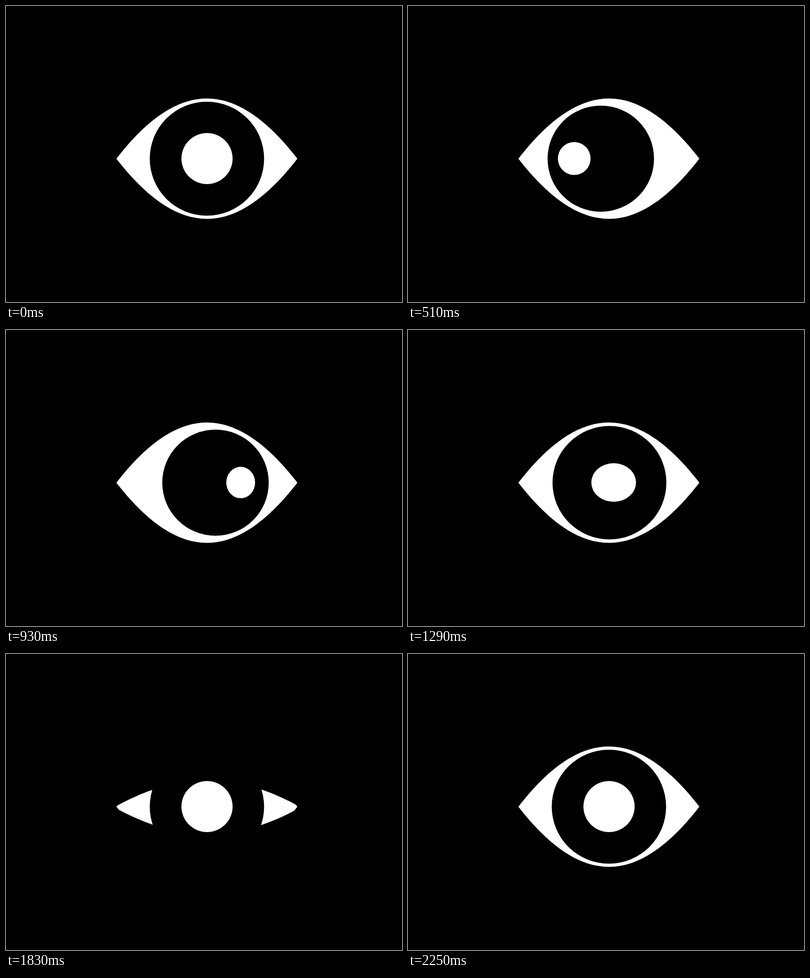
Recreate the animation shown at these times as an HTML page. Size 800x600 px, loop 2520 ms.

```html
<!DOCTYPE html>
<html lang="en">
<head>
<meta charset="utf-8">
<title>Eye</title>
<style>
  html, body { margin: 0; width: 100%; height: 100%; overflow: hidden; background: #000; }
  svg { display: block; width: 100vw; height: 100vh; }
</style>
</head>
<body>
<svg viewBox="0 0 800 600">
  <path id="eye" fill="#fff"/>
  <circle id="iris" cy="309.5"/>
  <ellipse id="pupil" cy="309.2" fill="#fff"/>
  <path id="lids" fill-rule="evenodd"/>
</svg>
<script>
const LOOP = 2520, STEP = 30;
const $ = id => document.getElementById(id);
const set = (el, attrs) => {
  for (const k in attrs) el.setAttribute(k, attrs[k]);
};
const span = (t, a, b) => Math.min(1, Math.max(0, (t - a) / (b - a)));
const inOut = (p, k) =>
  p < 0.5 ? 2 ** (k - 1) * p ** k : 1 - 2 ** (k - 1) * (1 - p) ** k;

// Look direction: 0 ahead, -1 left, 1 right; a higher power is snappier.
function gaze(t, power) {
  const leg = (a, b) => inOut(span(t, a, b), power);
  return 2 * leg(540, 1020) - leg(0, 540) - leg(1060, 1410);
}

// Almond outline; top and bottom are the heights at the middle.
function almond(cx, cy, half, top, bottom) {
  const at = (x, y) => `${cx + half * x} ${cy + y}`;
  const arch = (s, h) =>
    `C${at(s * 0.765, h * 0.455)} ${at(s * 0.415, h)} ${at(0, h)}` +
    `C${at(-s * 0.415, h)} ${at(-s * 0.765, h * 0.455)} ${at(-s, 0)}`;
  return `M${at(-1, 0)}${arch(-1, -top)}${arch(1, bottom)}Z`;
}

// Half the distance between the lids: a slow close, then a quick opening.
function lidGap(t) {
  const shut = inOut(span(t, 1610, 2070) ** 0.85, 2);
  return 129.5 * (1 - shut + inOut(span(t, 2070, 2250), 2.45));
}

function draw(t) {
  const u = gaze(t, 5.5);
  set($("iris"), { cx: 405.9 + u * (16.9 + 0.5 * u), r: 115.5 - 8 * Math.abs(u) });

  // The pupil shrinks to the sides and stretches along its way.
  const g = gaze(t, 3.5);
  const side = Math.abs(g) ** 0.37;
  const r = 51.7 - (20 + 1.5 * g) * side;
  const stretch = side * (14 * (1 - side) - 0.9 - 0.7 * g);
  set($("pupil"), { cx: 406.1 + 70.3 * g, rx: r + stretch, ry: r - stretch });

  const gap = lidGap(t);
  const hole = almond(407, 310.7, 188, gap - 1.3, gap * 0.95 + 1.3);
  const blinking = t > 1620 && t < 2250;
  set($("lids"), { d: blinking ? "M0 0H800V600H0Z" + hole : "" });
}

set($("eye"), { d: almond(405.8, 309.5, 182.8, 122, 122) });

const start = performance.now();
function tick() {
  const t = (performance.now() - start) % LOOP;
  draw(Math.floor(t / STEP) * STEP);
  requestAnimationFrame(tick);
}
tick();
</script>
</body>
</html>
```
